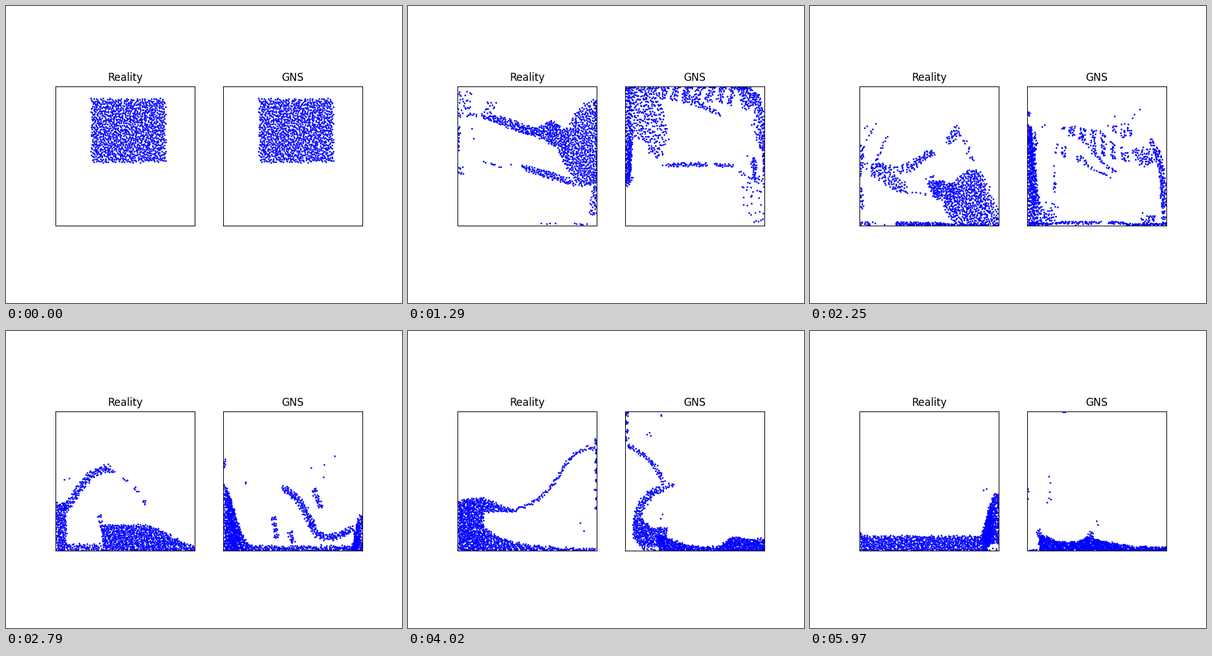
A matplotlib script that plays this animation: 640x480 px, repeating every 6 s.

```python
import numpy as np
import matplotlib.pyplot as plt
from matplotlib.animation import FuncAnimation

N = 1350                                   # particles per panel
FRAMES, STEP = 200, 30
KEYS = np.array([0, 28, 58, 93, 134, 168, 199])
TOP, BOTTOM = 129.67, 355.13               # stage pixels
REAL_X, GNS_X = (80, 305.455), (350.545, 576)
rng = np.random.default_rng(4)


def ramp(x, x0, x1):
    u = np.clip((x - x0) / (x1 - x0), 0, 1)
    return u * u * (3 - 2 * u)


def bump(x, centre, width):
    return np.exp(-((x - centre) / width) ** 2)


def noise(n, sx, sy):
    return rng.normal(0, sx, n) + 1j * rng.normal(0, sy, n)


def scatter(a, b, d, n=None):
    """Even points between edges a and b at density d; n pads with repeats."""
    wide = abs(a - b)
    areas = abs(np.diff(a + b)) * (wide[1:] + wide[:-1]) / 4
    cum = np.append(0, np.cumsum(areas))
    m = max(2, round(cum[-1] * d))
    if n is not None:
        m = min(m, n)
    i, k = np.arange(m), np.arange(len(a))
    s = np.interp(i * 0.754878 % 1 * cum[-1], cum, k)
    v = i * 0.569840 % 1
    z = np.interp(s, k, a) * (1 - v) + np.interp(s, k, b) * v
    z += noise(m, 0.9, 0.9)
    reach = min(2.7, 0.97 / d ** 0.5)
    for _ in range(3):                     # push close neighbours apart
        gap = z[:, None] - z
        dist = abs(gap) + 1e-6
        z = z + (gap * (0.25 * np.clip(reach / dist - 1, 0, 3))).sum(1)
    return z if n is None else z[np.arange(n) % m]


def body(x0, x1, top, bottom=BOTTOM, d=0.16):
    """Fluid between two surfaces, each a height or a function of x."""
    x = np.linspace(x0, x1, 120)
    a, b = (y(x) if callable(y) else x * 0 + y for y in (top, bottom))
    return x + 1j * a, x + 1j * b, d


def jet(w, *ctrl, d=0.13):
    """Ribbon of width w along a Bezier curve."""
    t = np.linspace(0, 1, 40)
    p = np.array([[complex(*c)] for c in ctrl])
    while len(p) > 1:
        p = p[:-1] * (1 - t) + p[1:] * t
    side = np.gradient(p[0]) * 1j
    side *= w / 2 / abs(side)
    return p[0] - side, p[0] + side, d


def spray(n, x, y, sx, sy):
    return complex(x, y) + noise(n, sx, sy)


def pose(main, *rest):
    """All N particles: the main body takes what the rest leaves."""
    parts = [r if isinstance(r, np.ndarray) else scatter(*r) for r in rest]
    left = N - sum(map(len, parts))
    return np.concatenate([scatter(*main, n=left), *parts])


def match(p, q):
    """Reorder q so that particles of p travel short, uncrossed ways."""
    out = np.empty_like(q)
    out[np.argsort(p.real)] = q[np.argsort(q.real)]
    for _ in range(2000):
        a, b = rng.permutation(N).reshape(2, -1)
        swap = ((p[a] - p[b]).conj() * (out[a] - out[b])).real < 0
        a, b = a[swap], b[swap]
        out[a], out[b] = out[b], out[a]
    return out


def bounce(v, lo, hi):
    v = lo + abs(v - lo)
    return hi - abs(hi - v)


def paths(poses, xlim):
    """Smooth motion through the poses, bouncing off the walls."""
    def inside(z):
        return (bounce(z.real, xlim[0] + 1, xlim[1] - 1)
                + 1j * bounce(z.imag, TOP + 1, BOTTOM - 1))

    p = [inside(poses[0])]
    for q in poses[1:]:
        p.append(match(p[-1], inside(q)))
    p = np.array(p)
    vel = np.empty_like(p)
    vel[1:-1] = 0.5 * (p[2:] - p[:-2]) / (KEYS[2:] - KEYS[:-2])[:, None]
    vel[0] = (p[1] - p[0]) / KEYS[1]
    vel[-1] = (p[-1] - p[-2]) / (KEYS[-1] - KEYS[-2])
    out = []
    for f in range(FRAMES):
        k = min(np.searchsorted(KEYS, f, "right") - 1, len(KEYS) - 2)
        h = KEYS[k + 1] - KEYS[k]
        u = (f - KEYS[k]) / h
        e = ramp(u, 0, 1)
        z = (p[k] * (1 - e) + p[k + 1] * e
             + h * u * (1 - u) * ((1 - u) * vel[k] - u * vel[k + 1]))
        out.append(inside(z))
    return out


block = pose(body(138, 257, 150, 252))

# Reality: the block splashes up and right, then sloshes and settles.
real = [
    block,
    pose(body(83, 305,
              lambda x: 132 + 16 * bump(x, 190, 16) + 15 * bump(x, 233, 9),
              lambda x: 138 + 97 * ramp(x, 95, 300) + 9 * bump(x, 83, 6)),
         jet(4, (303, 240), (304, 320)),
         jet(3, (83, 142), (82, 199)),
         jet(2, (218, 354), (235, 354)),
         spray(6, 290, 353, 10, 2)),
    pose(body(250, 305, lambda x: 252 - 85 * ramp(x, 265, 308),
              lambda x: 275 + 80 * ramp(x, 252, 274)),
         body(112, 250,
              lambda x: 219 + 24 * ramp(x, 105, 200) - 9 * bump(x, 236, 8),
              lambda x: 228 + 28 * ramp(x, 105, 210) + 22 * ramp(x, 215, 255)),
         body(182, 268, 346),
         jet(3, (124, 183), (121, 222)),
         jet(3, (83, 152), (83, 235)),
         jet(3, (83, 258), (83, 310), d=0.1),
         jet(3, (86, 217), (102, 221)),
         jet(4, (82, 353), (112, 350)),
         spray(4, 150, 351, 22, 3)),
    pose(body(155, 305, lambda x: 313 + 34 * ramp(x, 220, 310)),
         body(81, 97, 277),
         body(97, 155, 344, d=0.12),
         jet(11, (92, 290), (118, 262), (128, 222), (168, 222)),
         jet(2, (168, 224), (212, 245), (232, 294), d=0.1),
         jet(4, (150, 298), (158, 330)),
         spray(2, 88, 240, 6, 2)),
    pose(body(81, 121, lambda x: 270 + 8 * bump(x, 81, 8), d=0.18),
         body(120, 170, lambda x: 269 + 18 * ramp(x, 115, 170), 292),
         body(120, 304, lambda x: 352 - 37 * np.exp((120 - x) / 45)),
         jet(4, (165, 291), (262, 265), (235, 190), (302, 188), d=0.15),
         jet(3, (304, 175), (304, 238)),
         jet(2, (304, 240), (304, 298), d=0.1),
         spray(2, 274, 310, 4, 8)),
    pose(body(81, 303,
              lambda x: (314 - 4 * bump(x, 145, 30) + 32 * ramp(x, 178, 224)
                         - 27 * ramp(x, 224, 285) + 29 * ramp(x, 281, 286)),
              d=0.19),
         jet(7, (279, 322), (286, 300)),
         jet(4, (303, 270), (303, 345), d=0.1)),
    pose(body(81, 305,
              lambda x: 331 - 4 * bump(x, 81, 10) - 69 * ramp(x, 274, 300),
              lambda x: BOTTOM - 12 * ramp(x, 280, 292), d=0.2),
         jet(3, (285, 353), (304, 353), d=0.1),
         spray(2, 283, 257, 3, 2)),
]

# GNS: the learned rollout drifts away and clings to the walls.
gns = [
    block + 271,
    pose(body(352, 576, 131,
              lambda x: (168 - 12 * bump(x, 385, 35)
                         + 65 * (1 - ramp(x, 358, 374))
                         + 55 * ramp(x, 555, 580))),
         jet(2, (352, 131), (576, 131), d=0.3),
         jet(3, (574, 205), (574, 255)),
         jet(2, (574, 258), (575, 354), d=0.1)),
    pose(body(352, 362, 132, d=0.2),
         *[jet(9, (x + 5, 138), (x - 4, 174), d=0.09)
           for x in np.linspace(370, 508, 7)],
         jet(8, (414, 158), (480, 203), d=0.09),
         jet(13, (525, 132), (550, 184)),
         jet(7, (545, 160), (570, 165), (574, 290)),
         jet(4, (574, 290), (574, 352), d=0.1),
         jet(4, (360, 353), (452, 352), d=0.18),
         jet(4, (475, 353), (576, 352), d=0.18),
         jet(7, (549, 320), (542, 353), d=0.16),
         spray(3, 490, 133, 45, 1)),
    pose(body(352, 576,
              lambda x: 347 - 100 * bump(x, 350, 24) - 50 * ramp(x, 558, 572),
              d=0.2),
         jet(4, (353, 208), (353, 222)),
         jet(10, (447, 256), (468, 255), (495, 315), d=0.15),
         jet(10, (492, 308), (502, 346), (535, 333), (562, 318), d=0.15),
         jet(7, (497, 256), (510, 288)),
         jet(6, (431, 300), (438, 338)),
         jet(7, (459, 324), (463, 344)),
         spray(2, 386, 243, 2, 3),
         spray(4, 510, 225, 16, 14)),
    pose(body(404, 576,
              lambda x: (349 - 19 * bump(x, 400, 40) - 13 * ramp(x, 495, 525)
                         - 4 * bump(x, 528, 12)), d=0.24),
         body(364, 418, lambda x: 303 + 14 * ramp(x, 375, 395),
              lambda x: 348 - 12 * bump(x, 364, 8)),
         jet(3, (353, 131), (353, 186)),
         jet(6, (355, 186), (400, 205), (413, 248)),
         jet(5, (427, 248), (408, 256)),
         jet(12, (408, 254), (368, 274), (371, 308)),
         jet(3, (380, 353), (404, 353)),
         spray(3, 390, 169, 3, 6),
         spray(2, 410, 297, 2, 4),
         spray(2, 406, 133, 6, 2)),
    pose(body(352, 576,
              lambda x: (341 + 6 * ramp(x, 470, 560) - 16 * bump(x, 394, 28)
                         - 7 * bump(x, 467, 14)), d=0.28),
         jet(3, (352, 233), (350, 265), (360, 286)),
         jet(2, (352, 186), (352, 203)),
         jet(4, (353, 300), (398, 320)),
         jet(4, (415, 317), (415, 331)),
         jet(4, (461, 329), (471, 323)),
         spray(4, 356, 140, 3, 1),
         spray(4, 382, 134, 8, 2),
         spray(4, 388, 230, 6, 14)),
    pose(body(370, 576,
              lambda x: (341 + 8 * ramp(x, 470, 535) - 10 * bump(x, 376, 18)
                         - 8 * bump(x, 452, 16)), d=0.32),
         jet(7, (369, 322), (375, 338)),
         jet(7, (447, 338), (457, 323)),
         jet(1, (357, 354), (368, 354), d=0.5),
         spray(2, 466, 310, 4, 4),
         spray(3, 353, 262, 1.5, 8),
         spray(6, 387, 254, 2, 12),
         spray(2, 410, 131, 1.5, 0)),
]

fig, axes = plt.subplots(1, 2, figsize=(6.4, 4.8), dpi=100)
panels = []
for ax, title, xlim, poses in zip(axes, ("Reality", "GNS"),
                                  (REAL_X, GNS_X), (real, gns)):
    ax.set(xlim=xlim, ylim=(BOTTOM, TOP), xticks=[], yticks=[], aspect=1)
    ax.set_title(title)
    line, = ax.plot([], [], "o", color="blue", ms=1)
    panels.append((line, paths(poses, xlim)))


def draw(f):
    for line, track in panels:
        line.set_data(track[f].real, track[f].imag)
    return [line for line, _ in panels]


anim = FuncAnimation(fig, draw, frames=FRAMES, interval=STEP, repeat=True,
                     repeat_delay=0, blit=False)
plt.show()
```
